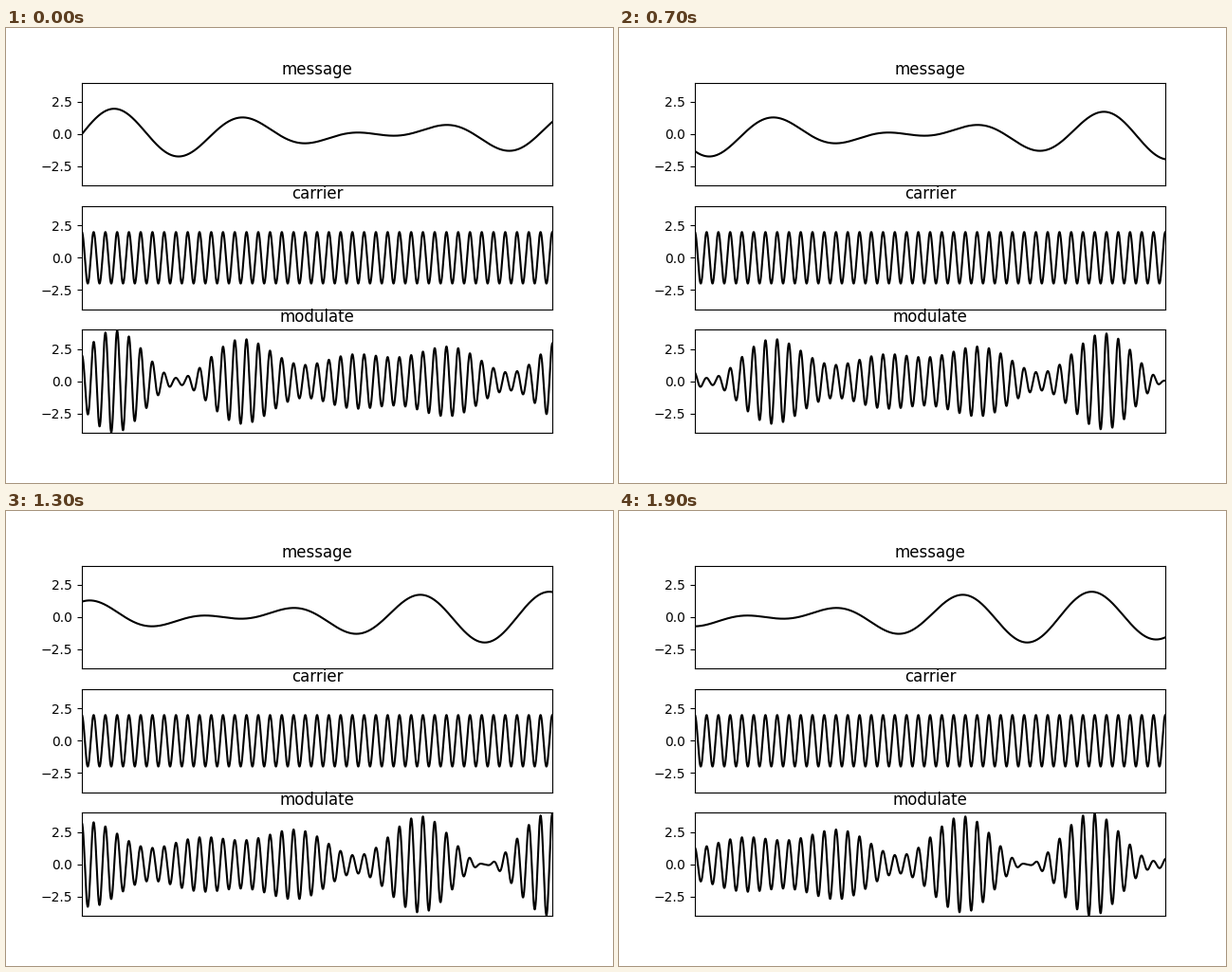
A matplotlib script for the animation above (2000 ms loop, 640x480 px).

```python
import numpy as np
import matplotlib.pyplot as plt
from matplotlib.animation import FuncAnimation

FRAMES, INTERVAL = 20, 100   # one loop of 2 s
SPAN, STEP = 4.0, 0.1        # visible seconds, scroll per frame
CARRIER_HZ = 10

t = np.linspace(0, SPAN, 2001)


def message(time):
    return np.sin(2 * np.pi * time) + np.sin(2 * np.pi * 0.8 * time)


def carrier(time):
    return np.cos(2 * np.pi * CARRIER_HZ * time)


fig, axes = plt.subplots(3, 1, figsize=(6.4, 4.8), dpi=100)
lines = []
for ax, title in zip(axes, ("message", "carrier", "modulate")):
    ax.set_title(title)
    ax.set_xlim(0, SPAN)
    ax.set_ylim(-4, 4)
    ax.set_xticks([])
    ax.set_yticks([-2.5, 0, 2.5])
    line, = ax.plot([], [], color="black", lw=1.5)
    lines.append(line)


def update(frame):
    now = t + frame * STEP
    m, c = message(now), carrier(now)
    for line, y in zip(lines, (m, 2 * c, (2 + m) * c)):
        line.set_data(t, y)
    return lines


def init():
    return update(0)


anim = FuncAnimation(fig, update, frames=FRAMES, init_func=init,
                     interval=INTERVAL, repeat=True, repeat_delay=0)
plt.show()
```
